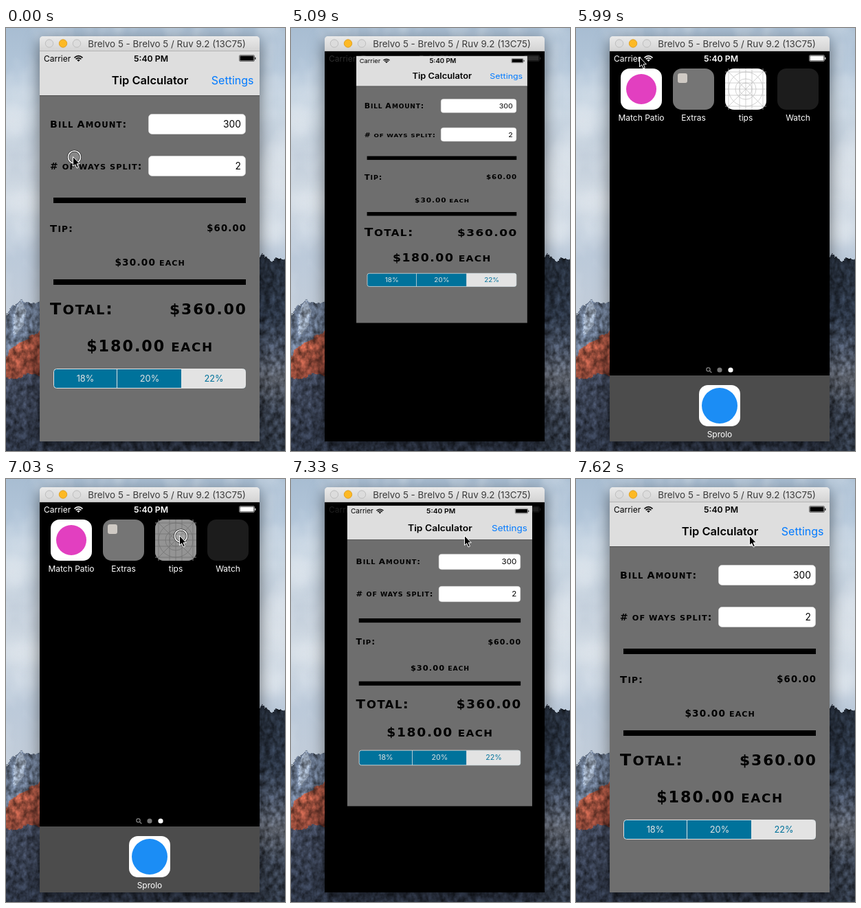
An HTML page that plays this animation: 406x616 px, repeating every 8 s.

```html
<!DOCTYPE html>
<html lang="en">
<head>
<meta charset="utf-8">
<title>Tip Calculator</title>
<style>
  html, body { margin: 0; width: 100%; height: 100%; overflow: hidden; background: #b9c8d8; }
  svg { display: block; }
  text { font-family: Inter, sans-serif; white-space: pre; }
  .copper, .copper tspan { font-family: "DejaVu Sans", sans-serif; font-weight: bold; letter-spacing: .09em; }
  #frame { filter: drop-shadow(0 7px 11px rgba(0, 0, 0, .5)); }
</style>
</head>
<body>
<svg width="406" height="616" viewBox="0 0 406 616">
  <defs>
    <linearGradient id="sky" x2="0" y2="1">
      <stop offset="0" stop-color="#a8bdd2"/>
      <stop offset=".1" stop-color="#b3c6d9"/>
      <stop offset=".2" stop-color="#cad7e3"/>
      <stop offset=".3" stop-color="#c0ccd9"/>
      <stop offset=".4" stop-color="#d3dce5"/>
      <stop offset=".54" stop-color="#bccada"/>
      <stop offset=".7" stop-color="#c3cdd9"/>
    </linearGradient>
    <linearGradient id="ridge" x2="0" y2="1">
      <stop offset="0" stop-color="#232b37"/>
      <stop offset=".3" stop-color="#2c3646"/>
      <stop offset=".45" stop-color="#485264"/>
      <stop offset=".6" stop-color="#5a5f69"/>
      <stop offset=".75" stop-color="#39414f"/>
      <stop offset="1" stop-color="#29313e"/>
    </linearGradient>
    <linearGradient id="rock" x2="1" y2="1">
      <stop offset="0" stop-color="#c0644a"/>
      <stop offset="1" stop-color="#74382f"/>
    </linearGradient>
    <linearGradient id="forest" x2="0" y2="1">
      <stop offset="0" stop-color="#3d4557"/>
      <stop offset="1" stop-color="#2b3343"/>
    </linearGradient>
    <linearGradient id="bar" x2="0" y2="1">
      <stop offset="0" stop-color="#eaeaea"/>
      <stop offset="1" stop-color="#d3d3d3"/>
    </linearGradient>
    <filter id="soft" x="-50%" y="-50%" width="200%" height="200%"><feGaussianBlur stdDeviation="9"/></filter>
    <!-- Grainy stone: jagged edges and light and dark specks. -->
    <filter id="stone" color-interpolation-filters="sRGB">
      <feTurbulence type="fractalNoise" baseFrequency=".13 .1" numOctaves="3" seed="4" result="noise"/>
      <feDisplacementMap in="SourceGraphic" in2="noise" scale="9" xChannelSelector="R" yChannelSelector="G" result="shape"/>
      <feColorMatrix in="noise" values="1 0 0 0 0  1 0 0 0 0  1 0 0 0 0  0 0 0 0 1" result="gray"/>
      <feComposite in="shape" in2="gray" operator="arithmetic" k1="1.5" k2=".25" result="grain"/>
      <feComposite in="grain" in2="shape" operator="in"/>
    </filter>
    <filter id="mist" color-interpolation-filters="sRGB">
      <feTurbulence type="fractalNoise" baseFrequency=".022 .014" numOctaves="3" seed="9"/>
      <feColorMatrix values="0 0 0 0 .88  0 0 0 0 .91  0 0 0 0 .94  2.2 0 0 0 -.9"/>
    </filter>
    <clipPath id="screen"><rect x="49" y="34" width="320" height="568"/></clipPath>
  </defs>

  <rect width="406" height="616" fill="url(#sky)"/>
  <g filter="url(#soft)" fill="#e2e8ee" opacity=".6">
    <ellipse cx="8" cy="135" rx="28" ry="22"/>
    <ellipse cx="30" cy="255" rx="34" ry="16"/>
    <ellipse cx="395" cy="205" rx="32" ry="38"/>
    <ellipse cx="385" cy="295" rx="30" ry="18"/>
  </g>
  <rect width="406" height="400" filter="url(#mist)" opacity=".5"/>
  <g filter="url(#stone)">
    <path d="M-10 430 10 404 23 397 36 401 60 398V480H-10Z" fill="#66748a"/>
    <path d="M14 408 23 397 30 412 24 436 12 450Z" fill="#8f9cae"/>
    <path d="M-10 488 12 464 28 452 60 436V520H-10Z" fill="url(#rock)"/>
    <path d="M-10 507 18 512 34 503 60 510V600H416V630H-10Z" fill="url(#forest)"/>
    <path d="M360 340 374 330 386 339 398 334 416 338V630H360Z" fill="url(#ridge)"/>
  </g>

  <g id="frame">
    <path d="M49 602V17a5 5 0 0 1 5-5H364a5 5 0 0 1 5 5V602Z" fill="url(#bar)"/>
    <rect x="49" y="34" width="320" height="568"/>
  </g>
  <path d="M49 34V17a5 5 0 0 1 5-5H364a5 5 0 0 1 5 5V34Z" fill="url(#bar)"/>
  <path d="M49 33.5H369" stroke="#b4b4b4"/>
  <g fill="#dcdcdc" stroke="#bdbdbd">
    <circle cx="63" cy="22.5" r="5.7"/>
    <circle cx="83" cy="22.5" r="5.7" fill="#fdb924" stroke="#dfa023"/>
    <circle cx="103" cy="22.5" r="5.7"/>
  </g>
  <text x="234" y="27.5" font-size="13.4" text-anchor="middle" fill="#3a3a3a">Brelvo 5 - Brelvo 5 / Ruv 9.2 (13C75)</text>

  <g clip-path="url(#screen)">
    <g id="home"></g>
    <g id="homeStatus"></g>
    <g id="app"></g>
  </g>
  <g id="pointer">
    <g id="click">
      <circle cx="2.5" cy="1" r="9" fill="#fff" fill-opacity=".18" stroke="#222" stroke-width="3"/>
      <circle cx="2.5" cy="1" r="9" fill="none" stroke="#fff" stroke-width="1.6"/>
    </g>
    <path d="M.5 .5V14.5L3.7 11.7 6 17 8.4 16 6.1 10.8H10.3Z" stroke="#fff"/>
  </g>
</svg>

<script>
const $ = id => document.getElementById(id);
const clamp = v => Math.max(0, Math.min(1, v));

const text = (x, y, size, str, anchor = 'start', extra = '') =>
  `<text x="${x}" y="${y}" font-size="${size}" text-anchor="${anchor}" ${extra}>${str}</text>`;

// Wide capitals with smaller capitals in place of lower case.
function copper(x, y, size, str, anchor = 'start') {
  const trailing = { start: 0, middle: .045, end: .09 }[anchor] * size;
  const caps = str.replace(/[a-z ]+/g, s => `<tspan font-size="${size * .82}">${s.toUpperCase()}</tspan>`);
  return text(x + trailing, y, size, caps, anchor, 'class="copper"');
}

const rect = (x, y, w, h, fill, rx = 0, extra = '') =>
  `<rect x="${x}" y="${y}" width="${w}" height="${h}" rx="${rx}" fill="${fill}" ${extra}/>`;

const status = color => `<g fill="${color}">
  ${text(55, 48.5, 12, 'Carrier')}
  ${text(211, 48.5, 12.3, '5:40 PM', 'middle', 'font-weight="600"')}
  <path d="M99.5 43.3Q105.5 38 111.5 43.3M101.6 45.4Q105.5 42 109.4 45.4" fill="none" stroke="${color}" stroke-width="1.6"/>
  <path d="M103.2 46.6Q105.5 44.8 107.8 46.6L105.5 49Z"/>
  ${rect(339.5, 39.5, 22, 9, 'none', 1.5, `stroke="${color}" stroke-width=".7" stroke-opacity=".7"`)}
  ${rect(340.5, 40.5, 20, 7, color, .6)}${rect(362.2, 42.5, 1.2, 3.4, color, .6)}</g>`;

const segment = (x, label, color) => text(x, 515, 12.8, label, 'middle', `fill="${color}"`);

$('app').innerHTML =
  rect(49, 34, 320, 568, '#6e6e6e') + rect(49, 34, 320, 64, '#dedede') + rect(49, 98, 320, 1, '#4d4d4d') +
  status('#000') +
  text(209.5, 82, 16.5, 'Tip Calculator', 'middle', 'font-weight="600"') +
  text(360.5, 82, 16, 'Settings', 'end', 'fill="#007aff"') +
  [125, 186].map(y => rect(207.5, y + .5, 141, 29, '#fff', 5, 'stroke="#d8d8d8" stroke-width=".6"')).join('') +
  text(342, 145, 13.8, '300', 'end') + text(342, 206, 13.8, '2', 'end') +
  copper(64, 145, 14.2, 'Bill Amount:') + copper(64, 206, 13.8, '# of ways split:') +
  rect(69, 247, 280, 8, '#000') + rect(69, 366, 280, 8, '#000') +
  copper(64, 297, 14.8, 'Tip:') + copper(349, 296, 13.2, '$60.00', 'end') +
  copper(209, 345.5, 13.6, '$30.00 each', 'middle') +
  copper(64, 416.5, 23.8, 'Total:') + copper(349, 416.5, 21.8, '$360.00', 'end') +
  copper(208.5, 470.5, 22.2, '$180.00 each', 'middle') +
  rect(69.5, 496.5, 279, 28, '#00729b', 4) +
  '<path d="M255 496.5H344.5a4 4 0 0 1 4 4V520.5a4 4 0 0 1-4 4H255Z" fill="#e3e3e3"/>' +
  rect(69.5, 496.5, 279, 28, 'none', 4, 'stroke="#e3e3e3"') +
  '<path d="M161.5 496.5V524.5" stroke="#e3e3e3"/>' +
  segment(115.5, '18%', '#e3e3e3') + segment(209, '20%', '#e3e3e3') + segment(302.5, '22%', '#00729b');

const tile = (x, y, fill, label) =>
  rect(x, y, 60, 60, fill, 13) + text(x + 30, y + 76, 12, label, 'middle', 'fill="#fff"');
const disc = (x, y, r, fill) => `<circle cx="${x}" cy="${y}" r="${r}" fill="${fill}"/>`;

const guides = `<g fill="none" stroke="#bcbcbc" stroke-width=".7" transform="translate(247 89)">
  ${[9, 15, 25].map(r => `<circle r="${r}"/>`).join('')}
  ${[-25, -9, 0, 9, 25].map(d => `<path d="M${d}-30V30M-30 ${d}H30"/>`).join('')}
  <path d="M-26-26 26 26M26-26-26 26"/></g>`;

$('home').innerHTML =
  tile(65, 59, '#fff', 'Match Patio') + disc(95, 89, 22, '#e23fc0') +
  tile(141, 59, '#757575', 'Extras') + rect(148, 66, 14, 14, '#cfcac4', 3) +
  tile(217, 59, '#fff', 'tips') + guides + rect(217, 59, 60, 60, '#000', 13, 'id="pressed" opacity=".42"') +
  tile(293, 59, '#1c1c1c', 'Watch') +
  '<g fill="none" stroke="#808080" stroke-width="1.3"><circle cx="192.5" cy="497.3" r="2.6"/><path d="M194.5 499.3 197.3 502"/></g>' +
  disc(209, 498, 3.6, '#757575') + disc(225, 498, 3.6, '#fff') +
  rect(49, 506, 320, 96, '#4c4c4c') + tile(179, 520, '#fff', 'Sprolo') + disc(209, 550, 26, '#1b8df5');
$('homeStatus').innerHTML = status('#fff');

// Screen steps: [start ms, progress from full app (0) to home screen (1)]
const screenSteps = [[0, 0], [5090, .274], [5240, .7], [5390, .95], [5540, 1],
  [7180, .68], [7330, .196], [7470, .006], [7620, 0]];
// Pointer steps: [start ms, x, y, clicking]; no position means hidden
const pointerSteps = [[0, 97, 187, true], [150, 69, 180], [300], [5840, 75, 39], [5990, 92, 42],
  [6290, 134, 44], [6440, 199, 69], [6590, 214, 77], [6740, 249, 82], [6890, 252, 84],
  [7030, 252, 82, true], [7180, 252, 82]];
const stepAt = (steps, t) => steps.findLast(s => s[0] <= t);
const show = (id, visible) => $(id).setAttribute('visibility', visible ? 'inherit' : 'hidden');

function drawScreen(p) {
  const left = 49 + 168 * p, top = 34 + 25 * p, width = 320 - 260 * p;
  // The lower edge runs ahead of the sides.
  const bottom = 602 - 483 * (1 - (1 - p) ** 1.38);
  const height = bottom - top, zoom = width / 60;

  $('app').setAttribute('transform',
    `translate(${left} ${top}) scale(${width / 320} ${height / 568}) translate(-49 -34)`);
  $('app').setAttribute('opacity', clamp((1 - p) * 2));
  $('home').setAttribute('transform',
    `translate(${left + width / 2} ${top + height / 2}) scale(${zoom}) translate(-247 -89)`);
  $('home').setAttribute('opacity', clamp((p - .3) * 2));
  $('homeStatus').setAttribute('opacity', (p + p * p) / 2);
}

function draw(now) {
  const t = now % 8000;
  const [, x, y, clicking] = stepAt(pointerSteps, t);
  drawScreen(stepAt(screenSteps, t)[1]);
  show('pointer', x !== undefined);
  show('click', clicking);
  show('pressed', clicking);
  if (x !== undefined) $('pointer').setAttribute('transform', `translate(${x} ${y})`);
}

const start = performance.now();
function tick() {
  draw(performance.now() - start);
  requestAnimationFrame(tick);
}
tick();
</script>
</body>
</html>
```
